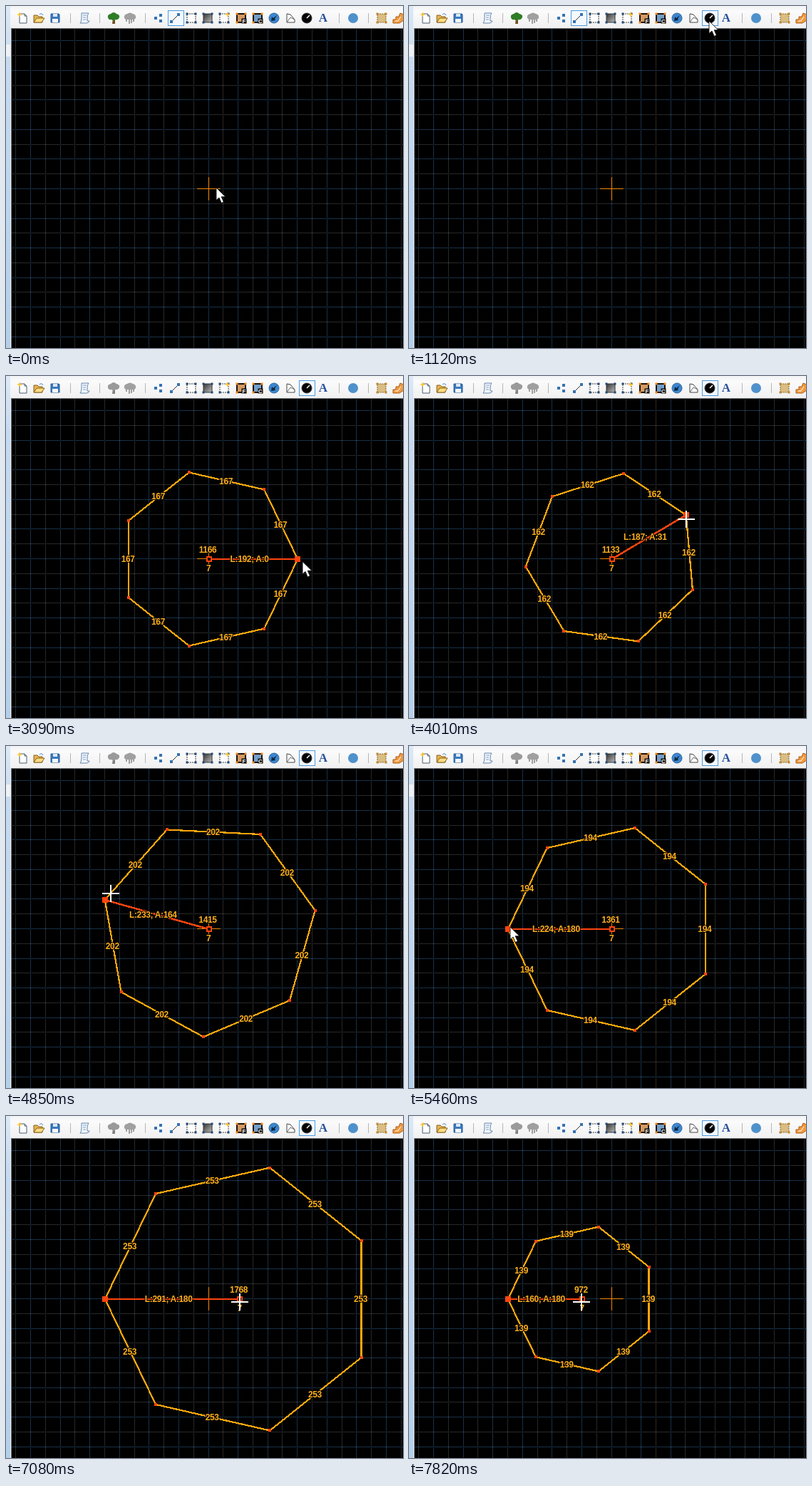
Animation, 557 px wide and 480 px high, one loop 8000 ms. Source, as an HTML page:

```html
<!DOCTYPE html>
<html lang="en">
<head>
<meta charset="utf-8">
<title>Polygon tool</title>
<style>
html, body { margin: 0; width: 100%; height: 100%; overflow: hidden; background: #000; }
svg { display: block; width: 557px; height: 480px; }
.label { font: bold 12px "Liberation Sans", Arial, sans-serif; letter-spacing: -.35px; fill: #ffb01c;
  text-anchor: middle; paint-order: stroke; stroke: #000; stroke-width: 2px; }
.crisp { shape-rendering: crispEdges; }
</style>
</head>
<body>
<svg viewBox="0 0 557 480">
  <defs>
    <linearGradient id="bar" x2="0" y2="1">
      <stop offset="0" stop-color="#f1f2f4"/><stop offset=".25" stop-color="#fbfbfc"/><stop offset="1" stop-color="#f0f0f0"/>
    </linearGradient>
    <linearGradient id="side" x2="0" y2="1">
      <stop offset="0" stop-color="#dce9f7"/><stop offset=".16" stop-color="#c6daf0"/><stop offset="1" stop-color="#b4cfea"/>
    </linearGradient>
    <linearGradient id="fade" x2="1" y2="1">
      <stop offset="0" stop-color="#333"/><stop offset="1" stop-color="#bbb"/>
    </linearGradient>
  </defs>
  <rect width="557" height="480"/>
  <g id="grid" class="crisp"></g>
  <g class="crisp">
    <rect width="557" height="31" fill="url(#bar)"/>
    <rect y="31" width="557" height="1" fill="#70757a"/>
    <rect width="6" height="480" fill="url(#side)"/>
    <rect x="6" y="31" width="1" height="449" fill="#e4ebf2"/>
    <rect x="7" y="31" width="1" height="449" fill="#70757a"/>
    <rect id="patch" y="54" width="6" height="17" fill="#eef1f4"/>
  </g>
  <g id="boxes" class="crisp" fill="#f4f9ff" stroke="#4c9be0">
    <rect id="lineBox" x="227.5" y="6.5" width="22" height="21"/>
    <rect id="polyBox" x="411.5" y="6.5" width="22" height="21"/>
  </g>
  <g id="icons"></g>
  <path class="crisp" d="M268 256.5h33M284.5 240v33" stroke="#f58a0a" fill="none"/>
  <g id="shape">
    <g class="crisp">
      <path id="outline" fill="none" stroke="#ffa80a" stroke-width="2.2"/>
      <path id="radius" stroke="#ff4510" stroke-width="2.5"/>
      <path id="dots" fill="#ff4510"/>
      <rect id="hub" width="6" height="6" fill="#000" stroke="#ff4510" stroke-width="2"/>
      <rect id="tip" width="6" height="6" fill="none" stroke="#ff4510" stroke-width="2"/>
    </g>
    <g id="labels"></g>
  </g>
  <path id="arrow" d="M0 0V17.5L4 14L7.2 21.5L10.4 20L7.2 12.8H13Z" fill="#fff" stroke="#000" stroke-width=".8"/>
  <path id="cross" class="crisp" d="M-12 0H12M0-12V12" stroke="#fff" stroke-width="2"/>
</svg>
<script>
const LOOP = 8000, SIDES = 7, SCALE = .65, CX = 284.5, CY = 257, CELL = 20.78;
const $ = id => document.getElementById(id);
const rad = deg => deg * Math.PI / 180;

// Screen refreshes: first time, last time, count
const bursts = [[0, 0, 1], [110, 1120, 6], [1320, 1930, 4], [2280, 3300, 6], [3500, 3500, 1],
  [3800, 4640, 5], [4850, 5870, 6], [6070, 7080, 6], [7290, 7500, 2], [7820, 7820, 1]];
const ticks = bursts.flatMap(([a, b, n]) => Array.from({ length: n },
  (_, i) => n > 1 ? Math.floor((a + (b - a) * i / (n - 1)) / 10) * 10 : a));

// Pointer path while it is not dragging: time, x, y
const free = [[0, 295, 255], [310, 318, 214], [920, 419, 24], [1320, 423, 18], [1930, 292, 251],
  [2280, 291, 253], [2890, 417, 261], [3300, 415, 260], [5460, 142, 254], [5870, 180, 255], [6470, 287, 252]];
// Dragged corner: time, angle, length
const corner = [[2280, 0, 6], [2480, 0, 62], [2890, 0, 191.95], [3300, 0, 191.95], [3500, 8, 190],
  [4010, 30.7, 186.52], [4430, 100, 212], [4850, 164.3, 232.95], [5460, 180, 224.06]];
// Pointer offset from the corner: time, x, y
const grip = [[3500, 4, 4], [4010, 0, 6], [4850, 8, -9], [5460, 4, 0]];
// Centre shift: time, distance
const shift = [[6470, 0], [7080, 67], [7290, 2], [7500, -61], [7820, -64.04]];

function at(keys, t) {
  let i = 0;
  while (i < keys.length - 1 && keys[i + 1][0] <= t) i++;
  const a = keys[i], b = keys[i + 1];
  if (!b || t <= a[0]) return a.slice(1);
  const p = (t - a[0]) / (b[0] - a[0]);
  return a.slice(1).map((v, k) => v + (b[k + 1] - v) * p);
}

// Dots follow a checkerboard, so lines on odd pixels start one pixel later.
function drawGrid() {
  let out = "";
  const line = (d, k) => out += `<path d="${d}" stroke="${k % 2 ? "#505050" : "#30618f"}" stroke-dasharray="1 1"/>`;
  for (let pass = 1; pass >= 0; pass--)
    for (let k = -13; k <= 13; k++) {
      if (Math.abs(k % 2) !== pass) continue;
      const x = Math.floor(284 + CELL * k), y = Math.round(256 + CELL * k);
      line(`M${x + .5} ${32 + x % 2}V480`, k);
      if (y > 32 && y < 480) line(`M${8 + y % 2} ${y + .5}H557`, k);
    }
  $("grid").innerHTML = out;
}

function drawIcons() {
  const path = (d, fill, stroke = "none", more = "") => `<path d="${d}" fill="${fill}" stroke="${stroke}" ${more}/>`;
  const dot = (x, y, c, s = 3) => `<rect x="${x - s / 2}" y="${y - s / 2}" width="${s}" height="${s}" fill="${c}"/>`;
  const corners = c => [[-6, -6], [6, -6], [-6, 6], [6, 6]].map(([x, y]) => dot(x, y, c)).join("");
  const box = (fill, stroke, dash = "") => path("M-6-6H6V6H-6Z", fill, stroke, `stroke-dasharray="${dash}"`);
  const star = path("M0-4L1-1 4 0 1 1 0 4-1 1-4 0-1-1Z", "#ffc52c", "none", 'transform="translate(5-5)"');
  const ball = (c, edge) => `<circle r="7" fill="${c}" stroke="${edge}"/>`;
  const letter = (s, size, x, y, c, font) =>
    `<text x="${x}" y="${y}" text-anchor="middle" font-family="${font}" font-size="${size}" font-weight="bold" fill="${c}">${s}</text>`;
  const sans = "Liberation Sans, sans-serif", serif = "Liberation Serif, serif";
  const tagged = (s, fill) => path("M-6-6H6V6H-6Z", fill, "#1c1410", 'stroke-width="2"') + corners("#f08a1c") +
    dot(4, 4, "#111", 7) + letter(s, 8, 4, 7, "#fff", sans);
  const tree = (leaf, trunk) => path("M-1 1H2V8H-2Z", trunk) +
    path("M-8-1Q-9-5-4-6Q0-10 4-6Q9-5 8-1Q6 3 2 2L0 4-3 2Q-7 3-8-1Z", leaf);
  const bush = c => path("M-8 0Q-9-5-4-6Q0-9 4-6Q9-5 8 0L6 2H-6Z", c) + path("M-5 2V5M-1 2V8M2 2V7M5 2V5", "none", c, 'stroke-width="2"');
  const list = [
    [23, path("M-4-6H3L6-3V7H-4Z", "#fff", "#4c5c6e") + path("M3-6V-3H6", "none", "#4c5c6e") +
      `<g transform="translate(-9 0)">${star}</g>`],
    [46, path("M-7 6V-4H-2L0-2H5V6Z", "#e8b650", "#84601f") + path("M-7 6L-3 0H8L4 6Z", "#ffdc80", "#84601f") +
      path("M1-5Q4-8 6-4", "none", "#3c7fc4")],
    [69, path("M-6-6H5L6-5V6H-6Z", "#3b79bd", "#275a94") + path("M-3-6H3V-2H-3Z", "#dce8f4") + path("M-4 1H4V6H-4Z", "#f4f7fa")],
    [110, path("M-4-7H6Q4-5 4 0V4H7Q6 7 3 7H-6Q-4 5-4 0Z", "#f3f8fd", "#6485aa") + path("M-2-4H3M-2-1H2M-2 2H2", "none", "#7f9fc4")],
    [151, `<g id="greenTree">${tree("#2f7d26", "#735022")}</g><g id="greyTree">${tree("#9a9a9a", "#808080")}</g>`],
    [174, bush("#a0a0a0")],
    [214, dot(-4, 0, "#3572b0", 4) + dot(3, -4, "#3572b0", 4) + dot(3, 4, "#3572b0", 4)],
    [237, path("M-5 5L5-5", "none", "#333") + dot(-5, 5, "#3572b0", 4) + dot(5, -5, "#3572b0", 4)],
    [260, box("#fff", "#333", "2 1") + corners("#234a74")],
    [283, box("url(#fade)", "#333") + corners("#234a74")],
    [306, box("#fff", "#444", "2 1") + corners("#234a74") + star],
    [330, tagged("F", "#d59a62")],
    [353, tagged("C", "#759fc9")],
    [376, ball("#3d87d0", "#2b659f") + path("M-4 4L-3-2-1 0 4-4 1 1 2 3Z", "#10273f")],
    [399, path("M-5 6V-6L0-5 6 2V6Z", "#fff", "#444") + path("M-5 6L0-1 6 2", "none", "#666")],
    [422, ball("#050505", "#333") + path("M0 0L4-4", "none", "#fff", 'stroke-width="1.5"')],
    [445, letter("A", 17, 0, 5, "#264f9c", serif)],
    [487, ball("#4f91cb", "none")],
    [527, box("#d9bd82", "#86692f", "2 1") + corners("#c48830")],
    [550, path("M-7 2H-3V-2H1L3-7 8-5V3L2 7H-7Z", "#f29a3e", "#a85c18") + path("M-4 4H0L4-2", "none", "#fff")]
  ];
  const seps = [90, 131, 195, 467, 508].map(x => `<path class="crisp" d="M${x + .5} 10V24" stroke="#b5b5b5"/>`).join("");
  $("icons").innerHTML = seps + list.map(([x, art]) => `<g transform="translate(${x} 17)">${art}</g>`).join("");
}

const show = (id, on) => $(id).setAttribute("display", on ? "inline" : "none");
const set = (id, d) => $(id).setAttribute("d", d);
function placeHandle(id, x, y) {
  $(id).setAttribute("x", Math.round(x) - 3);
  $(id).setAttribute("y", Math.round(y) - 3);
}

const labels = Array.from({ length: SIDES + 3 }, () => {
  const el = document.createElementNS("http://www.w3.org/2000/svg", "text");
  el.setAttribute("class", "label");
  return $("labels").appendChild(el);
});
function write(i, text, x, y) {
  labels[i].textContent = text;
  labels[i].setAttribute("x", x.toFixed(2));
  labels[i].setAttribute("y", (y + 4.3).toFixed(2));
}

function drawShape(hubX, tipX, tipY) {
  const dx = tipX - hubX, dy = CY - tipY;
  const r = Math.hypot(dx, dy), turn = Math.atan2(dy, dx);
  const pts = Array.from({ length: SIDES }, (_, i) => {
    const a = turn + i * 2 * Math.PI / SIDES;
    return [hubX + r * Math.cos(a), CY - r * Math.sin(a)];
  });
  const length = r / SCALE, side = 2 * length * Math.sin(Math.PI / SIDES);
  set("outline", "M" + pts.map(p => p.join(" ")).join("L") + "Z");
  set("radius", `M${hubX} ${CY}L${tipX} ${tipY}`);
  set("dots", pts.map(([x, y]) => `M${Math.round(x) - 2} ${Math.round(y) - 2}h4v4h-4z`).join(""));
  placeHandle("hub", hubX, CY);
  placeHandle("tip", tipX, tipY);
  pts.forEach(([x, y], i) => {
    const [nx, ny] = pts[(i + 1) % SIDES];
    write(i, Math.round(side), (x + nx) / 2 - .9, (y + ny) / 2);
  });
  const angle = Math.round(turn * 180 / Math.PI + 360) % 360;
  write(SIDES, `L:${Math.round(length)}; A:${angle}`, (hubX + tipX) / 2 - 5.3, (CY + tipY) / 2);
  write(SIDES + 1, Math.round(side * SIDES), hubX - 1.5, CY - 13);
  write(SIDES + 2, SIDES, hubX - .3, CY + 13);
}

function render(time) {
  const now = time % LOOP;
  const t = ticks.filter(v => v <= now).pop();
  const picked = t >= 1320, drawn = t >= 2280;
  const turning = t >= 3500 && t < 5460, sliding = t >= 6670;

  show("lineBox", !picked);
  show("polyBox", t >= 1120);
  show("greenTree", !picked);
  show("greyTree", picked);
  show("patch", t < 2280 || (t >= 4640 && t < 6670));
  show("shape", drawn);

  const [angle, length] = at(corner, t), [move] = at(shift, t);
  const hubX = CX + move * SCALE;
  const tipX = CX + length * SCALE * Math.cos(rad(angle));
  const tipY = CY - length * SCALE * Math.sin(rad(angle));
  if (drawn) drawShape(hubX, tipX, tipY);

  let [x, y] = at(free, t);
  if (turning) {
    const [gx, gy] = at(grip, t);
    x = Math.round(tipX + gx);
    y = Math.round(tipY + gy);
  } else if (sliding) {
    x = Math.round(hubX - .5);
    y = 261;
  }
  const dragging = turning || sliding;
  show("arrow", !dragging);
  show("cross", dragging);
  $(dragging ? "cross" : "arrow").setAttribute("transform", `translate(${x} ${y})`);
}

drawGrid();
drawIcons();
let start;
function loop(now) {
  start ??= now;
  render(Math.max(0, now - start));
  requestAnimationFrame(loop);
}
render(0);
requestAnimationFrame(loop);
</script>
</body>
</html>
```
